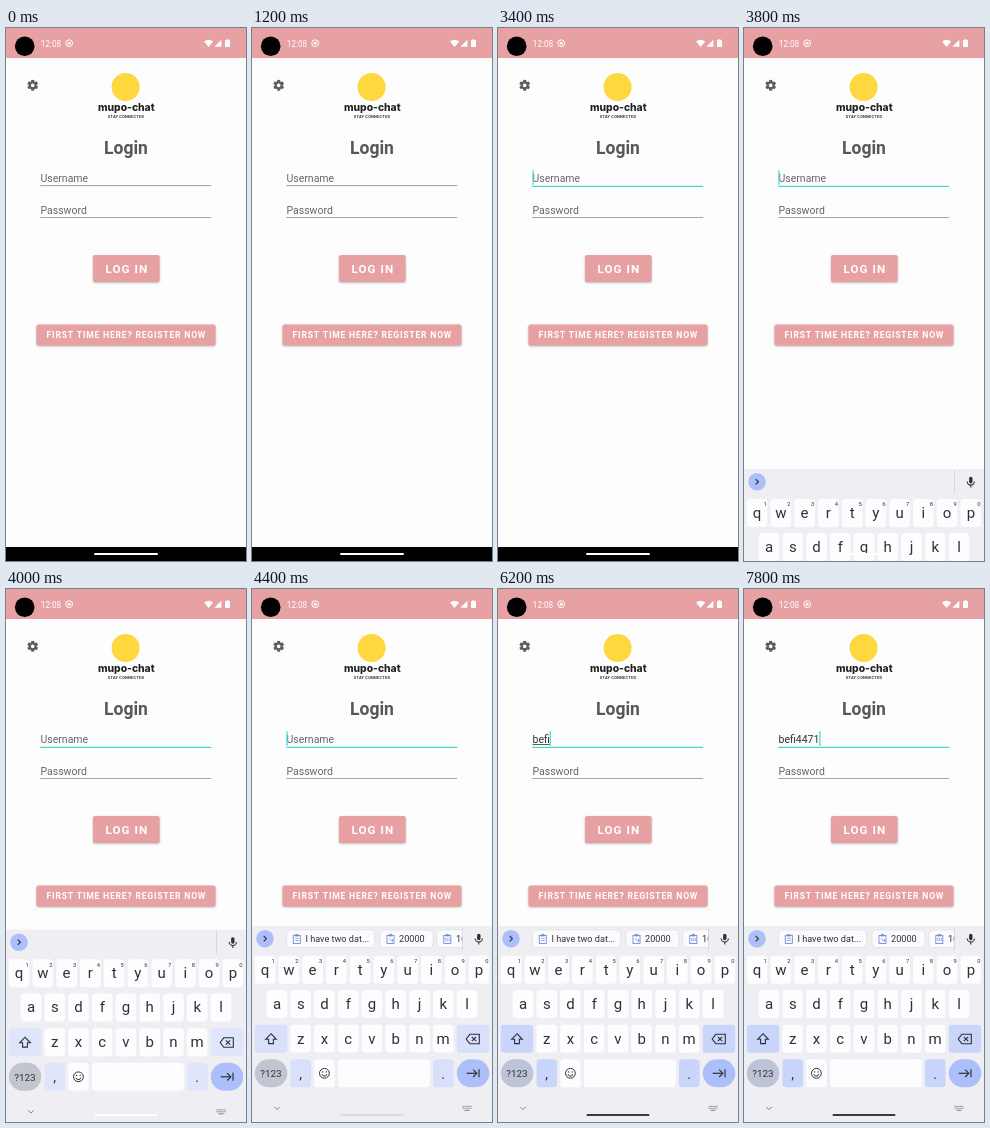
Write an HTML page with a canvas that moves like this. It is 240 px wide and 533 px high and loops after 8000 ms.

```html
<!DOCTYPE html>
<html lang="en">
<head>
<meta charset="utf-8">
<title>Login screen</title>
<style>
html, body { margin: 0; width: 100%; height: 100%; overflow: hidden; background: #fefdfe; }
canvas { display: block; width: 240px; height: 533px; }
</style>
</head>
<body>
<canvas id="stage"></canvas>
<script>
const W = 240, H = 533, LOOP = 8000, STEP = 200;
const FOCUS = 2800, CURSOR = 3400, SLIDE = 3740, SLIDE_MS = 410, CHIPS = 4400;
const NAME = 'befi4471';
const KEY_TIMES = [5600, 5800, 6000, 6200, 6600, 6800, 7000, 7400];
const COMMITTED = 7400;
const PINK = '#e7a1a3', TEAL = '#3fd6cc', INK = '#303136', BLUE = '#7289d6';

const canvas = document.getElementById('stage');
const g = canvas.getContext('2d');
const dpr = window.devicePixelRatio || 1;
canvas.width = W * dpr;
canvas.height = H * dpr;

const clamp = v => Math.max(0, Math.min(1, v));

function mix(a, b, p) {
  return `rgb(${a.map((v, i) => Math.round(v + (b[i] - v) * p)).join(',')})`;
}

function text(str, x, y, size, { color = INK, weight = 400, align = 'left', gap = 0, font = 'Roboto' } = {}) {
  g.font = `${weight} ${size}px ${font}, sans-serif`;
  g.letterSpacing = gap + 'px';
  g.textAlign = align;
  g.fillStyle = color;
  g.fillText(str, x, y);
  g.letterSpacing = '0px';
}

function rect(x, y, w, h, color) {
  g.fillStyle = color;
  g.fillRect(x, y, w, h);
}

function round(x, y, w, h, r, color) {
  g.fillStyle = color;
  g.beginPath();
  g.roundRect(x, y, w, h, r);
  g.fill();
}

function disc(x, y, r, color) {
  g.fillStyle = color;
  g.beginPath();
  g.arc(x, y, r, 0, 7);
  g.fill();
}

function ring(x, y, r, color, width) {
  g.strokeStyle = color;
  g.lineWidth = width;
  g.beginPath();
  g.arc(x, y, r, 0, 7);
  g.stroke();
}

// Points are x, y pairs relative to (x, y).
function trace(x, y, pts, closed) {
  g.beginPath();
  for (let i = 0; i < pts.length; i += 2) g.lineTo(x + pts[i], y + pts[i + 1]);
  if (closed) g.closePath();
}

function line(x, y, pts, color = INK, width = 1, closed = false) {
  trace(x, y, pts, closed);
  g.strokeStyle = color;
  g.lineWidth = width;
  g.stroke();
}

function poly(x, y, pts, color) {
  trace(x, y, pts, true);
  g.fillStyle = color;
  g.fill();
}

function statusBar() {
  rect(0, 0, W, 30, PINK);
  disc(18.7, 18.3, 9.8, '#000');
  text('12:08', 34.8, 18.5, 8.17, { color: '#fff' });
  ring(63.2, 15.2, 3.4, '#fff', 1);
  disc(63.2, 15.2, 1.5, '#fff');
  g.fillStyle = '#fff';
  g.beginPath();
  g.moveTo(202.6, 19);
  g.lineTo(198, 13.4);
  g.quadraticCurveTo(202.6, 10, 207.2, 13.4);
  g.fill();
  poly(208.4, 18.8, [0, 0, 7, 0, 7, -7], '#fff');
  round(219, 12, 5, 7, 0.7, '#fff');
  rect(220.5, 11.2, 2, 1, '#fff');
}

function gear(x, y) {
  const color = '#5c5c60';
  g.save();
  g.translate(x, y);
  for (let i = 0; i < 6; i++) {
    rect(-1.5, -5.4, 3, 3, color);
    g.rotate(Math.PI / 3);
  }
  g.restore();
  ring(x, y, 2.95, color, 2.1);
}

function button(label, x, y, w, h, base, size) {
  g.save();
  g.shadowColor = 'rgba(0,0,0,0.3)';
  g.shadowBlur = 2.2 * dpr;
  g.shadowOffsetY = 0.8 * dpr;
  round(x, y, w, h, 2, PINK);
  g.restore();
  const gap = size * 0.0893;
  text(label, x + w / 2 + gap / 2, base, size, { color: '#fff', weight: 700, align: 'center', gap });
}

function caretOn(t) {
  return t >= KEY_TIMES[0] || (t >= CURSOR && (t - CURSOR) % 1000 < 500);
}

function form(t) {
  const typed = NAME.slice(0, KEY_TIMES.filter(k => t >= k).length);
  const hint = '#66666a';
  text('Login', 120, 126, 17.5, { weight: 700, color: '#57575b', align: 'center' });

  if (typed) text(typed, 34.5, 153.8, 10.5, { color: '#333' });
  else text('Username', 34.5, 153.8, 10.5, { color: hint });
  const end = typed ? g.measureText(typed).width : 0;
  if (typed && t < COMMITTED) rect(34.5, 155, end, 0.8, '#333');
  if (t >= FOCUS) rect(34.3, 157.8, 170.9, 1.2, TEAL);
  else rect(34.3, 157.3, 170.9, 0.8, '#858587');
  if (caretOn(t)) rect(34.4 + end, 142.3, 1.2, 14.7, TEAL);

  text('Password', 34.5, 185.6, 10.5, { color: hint });
  rect(34.3, 189.2, 170.9, 0.8, '#8f8f92');
}

function page(t) {
  rect(0, 0, W, H, '#fefdfe');
  statusBar();
  gear(26.7, 57.3);
  disc(119.6, 59, 14, '#ffd83f');
  text('mupo-chat', 120.3, 83, 10.3, { weight: 800, align: 'center', color: '#222', font: 'Inter' });
  text('STAY CONNECTED', 120, 90, 3.9, { weight: 700, align: 'center', gap: 0.25, color: '#333' });
  form(t);
  button('LOG IN', 87, 227.1, 66.6, 26.8, 245, 11.67);
  button('FIRST TIME HERE? REGISTER NOW', 30.5, 296.4, 179, 21, 310.2, 8.65);
  rect(0, 519, W, 14, '#000');
  round(88, 525, 64, 2, 1, '#fff');
}

function letters(str, x, y) {
  [...str].forEach((ch, i) => {
    const cx = x + i * 23.75;
    round(cx - 10.3, y, 20.6, 28, 3.5, '#fdfdff');
    text(ch, cx, y + 18.7, 15, { align: 'center' });
  });
}

function clipboard(x, y) {
  g.strokeStyle = BLUE;
  g.lineWidth = 0.9;
  g.strokeRect(x - 3.5, y - 3.6, 7, 8);
  rect(x - 1.7, y - 4.8, 3.4, 2.2, BLUE);
}

function chip(x, w, label) {
  g.beginPath();
  g.roundRect(x, 341, w, 17.6, 4.5);
  g.fillStyle = '#fbfbfe';
  g.fill();
  g.strokeStyle = '#dcdde4';
  g.lineWidth = 0.7;
  g.stroke();
  clipboard(x + 10.5, 350);
  text(label, x + 19.1, 353.3, 9.15);
}

function chips() {
  g.save();
  g.beginPath();
  g.rect(30, 337, 180.3, 26);
  g.clip();
  chip(34.3, 88.5, 'I have two dat...');
  line(45, 350, [-1.7, -0.7, 1.7, -0.7], BLUE, 0.7);
  line(45, 350, [-1.7, 1.5, 1.7, 1.5], BLUE, 0.7);
  chip(128, 53, '20000');
  line(139, 351, [-2, -1.5, 1.5, 1.5, 1.5, -1], BLUE, 0.8);
  chip(184.8, 50, '16000');
  text('123', 195.3, 352.4, 3.4, { color: BLUE, weight: 700, align: 'center' });
  g.restore();
}

function mic(x, y) {
  round(x - 1.7, y - 5.3, 3.4, 6.6, 1.7, INK);
  g.strokeStyle = INK;
  g.lineWidth = 1.1;
  g.beginPath();
  g.arc(x, y - 0.6, 3.6, 0, Math.PI);
  g.stroke();
  line(x, y, [0, 3, 0, 5.5], INK, 1.1);
}

function toolbar(t) {
  disc(13, 349.7, 8.8, '#adbffb');
  line(13, 349.7, [-1.3, -2.7, 1.4, 0, -1.3, 2.7], INK, 1.1);
  if (t >= CHIPS) chips();
  rect(210.2, 338, 0.7, 23.5, '#cfd0d6');
  mic(226.8, 350);
}

function smiley(x, y) {
  ring(x, y, 4.9, INK, 1);
  disc(x - 1.8, y - 1.4, 0.7, INK);
  disc(x + 1.8, y - 1.4, 0.7, INK);
  g.beginPath();
  g.arc(x, y + 0.3, 2.5, 0.2, Math.PI - 0.2);
  g.stroke();
}

function keys(tint) {
  const side = mix([223, 229, 251], [202, 213, 251], tint);
  letters('qwertyuiop', 13.1, 366.8);
  [...'1234567890'].forEach((d, i) => text(d, 21.2 + i * 23.75, 374.3, 5.8, { align: 'center' }));
  letters('asdfghjkl', 25, 401);
  letters('zxcvbnm', 48.7, 435.8);

  round(2.8, 435.8, 32.5, 28, 3.5, side);
  line(19, 450, [0, -5.3, 5.3, 0.3, 2.4, 0.3, 2.4, 4.6, -2.4, 4.6, -2.4, 0.3, -5.3, 0.3], INK, 1.1, true);
  round(204.8, 435.8, 32.5, 28, 3.5, side);
  line(221, 450, [-6.8, 0, -3.2, -4.7, 6.3, -4.7, 6.3, 4.7, -3.2, 4.7], INK, 1.1, true);
  line(222, 450, [-2.2, -2.2, 2.2, 2.2], INK, 1.1);
  line(222, 450, [2.2, -2.2, -2.2, 2.2], INK, 1.1);

  round(2.8, 470.3, 32.5, 28, 14, mix([195, 197, 206], [190, 196, 215], tint));
  text('?123', 19, 488, 9.9, { align: 'center' });
  round(38.5, 470.3, 20.6, 28, 3.5, side);
  text(',', 48.7, 489.5, 14, { align: 'center' });
  round(62.2, 470.3, 20.6, 28, 3.5, '#fdfdff');
  smiley(72.4, 484.3);
  round(86, 470.3, 91.8, 28, 3.5, '#fdfdff');
  round(181, 470.3, 20.6, 28, 3.5, side);
  text('.', 191.2, 489.5, 14, { align: 'center' });
  round(204.8, 470.3, 32.5, 28, 14, '#adbffb');
  line(221, 484.3, [-6.3, 0, 3.6, 0], INK, 1.2);
  line(221, 484.3, [0.2, -3.7, 3.8, 0, 0.2, 3.7], INK, 1.2);
  line(221, 484.3, [6, -4, 6, 4], INK, 1.2);
}

function navIcons() {
  const grey = '#808186';
  line(25, 519.2, [-2.7, -1.3, 0, 1.4, 2.7, -1.3], grey, 1);
  for (let row = 0; row < 2; row++)
    for (let i = 0; i < 5; i++) rect(210.6 + i * 1.9, 516.8 + row * 1.9, 1.2, 1.1, grey);
  rect(212.5, 520.8, 5, 1, grey);
}

function keyboard(t) {
  const p = clamp((t - SLIDE) / SLIDE_MS);
  if (!p) return;
  const tint = clamp((t - 4000) / 1200);
  g.save();
  g.translate(0, 196 * (1 - p) ** 4);
  rect(0, 337, W, 200, '#efeef3');
  toolbar(t);
  keys(tint);
  navIcons();
  g.restore();
  const pill = t < 5200
    ? mix([255, 255, 255], [145, 145, 148], tint)
    : mix([145, 145, 148], [58, 58, 61], clamp((t - 5200) / 1000));
  round(88.5, 525, 63, 2, 1, pill);
}

function frame(now) {
  // The screen refreshes five times a second.
  const t = Math.floor((now % LOOP) / STEP) * STEP;
  g.setTransform(dpr, 0, 0, dpr, 0, 0);
  page(t);
  keyboard(t);
}

const start = performance.now();
function tick() {
  frame(performance.now() - start);
  requestAnimationFrame(tick);
}
tick();
</script>
</body>
</html>
```
